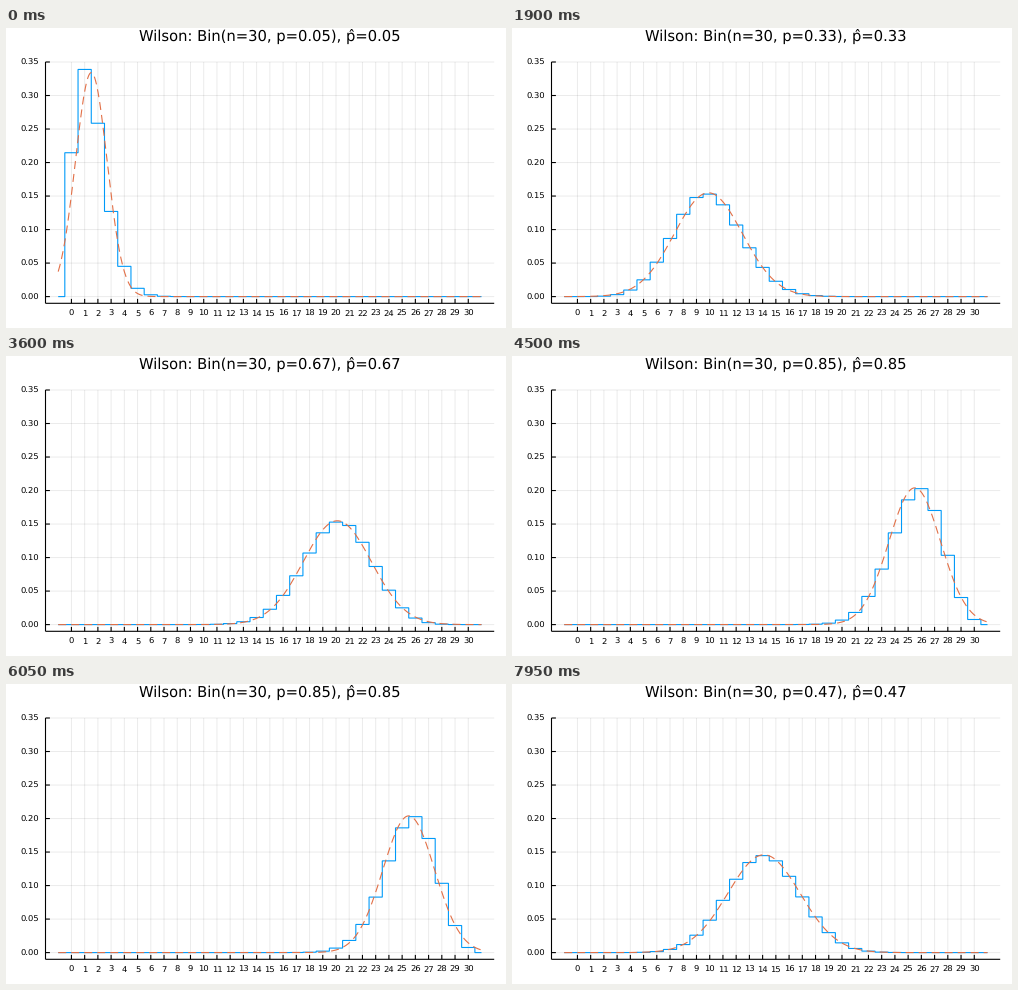
Animation, 500 px wide and 300 px high, one loop 8000 ms. Source, as a matplotlib script:

```python
import math

import matplotlib.pyplot as plt
import numpy as np
from matplotlib.animation import FuncAnimation

W, H, DPI = 500, 300, 100
PX = 72 / DPI                      # points per pixel
STEP_MS, FRAMES = 50, 160
N = 30
LEFT, RIGHT, TOP, BOTTOM = 39.5, 488.2, 34.0, 275.3
X_MIN, X_MAX = -1.96, 31.96
Y_MIN, Y_MAX = -0.01, 0.35
BLUE, ORANGE = "#009AF9", "#E26F46"

plt.rcParams["font.family"] = "DejaVu Sans"
plt.rcParams["text.hinting"] = "none"


def to_x(v):
    return LEFT + (np.asarray(v) - X_MIN) / (X_MAX - X_MIN) * (RIGHT - LEFT)


def to_y(v):
    return BOTTOM - (np.asarray(v) - Y_MIN) / (Y_MAX - Y_MIN) * (BOTTOM - TOP)


fig = plt.figure(figsize=(W / DPI, H / DPI), dpi=DPI, facecolor="white")
ax = fig.add_axes([0, 0, 1, 1])
ax.set_xlim(0, W)
ax.set_ylim(H, 0)
ax.axis("off")


def line(xs, ys, color="black", width=1.1, **kw):
    kw.setdefault("solid_capstyle", "butt")
    return ax.plot(xs, ys, color=color, lw=width * PX, snap=False, **kw)[0]


def label(x, y, text, size, ha="center"):
    return ax.text(x, y, text, fontsize=size * PX, ha=ha, va="baseline")


def draw_axes():
    for k in range(N + 1):
        x = to_x(k)
        line([x, x], [TOP, BOTTOM], width=1, alpha=0.08)
        line([x, x], [BOTTOM, BOTTOM - 4.4])
        label(x, 288, str(k), 8.41)
    for k in range(8):
        v = k * 0.05
        y = to_y(v)
        line([LEFT, RIGHT], [y, y], width=1, alpha=0.08)
        line([LEFT, LEFT + 4.4], [y, y])
        label(32.8, y + 3.1, f"{v:.2f}", 8.41, ha="right")
    line([LEFT, LEFT], [TOP, BOTTOM])
    line([LEFT, RIGHT], [BOTTOM, BOTTOM])


draw_axes()

ks = np.arange(N + 1)
choose = np.array([math.comb(N, k) for k in ks], dtype=float)
edges = np.concatenate(([-1], np.arange(-0.5, N + 1), [N + 1]))
step_x = to_x(np.repeat(edges, 2)[1:-1])
grid = np.linspace(-1, N + 1, 500)

bars = line(step_x, step_x * 0, BLUE, solid_joinstyle="miter")
curve = line(to_x(grid), grid * 0, ORANGE, dashes=(8 / 1.1, 5 / 1.1),
             dash_capstyle="butt")
title = label((LEFT + RIGHT) / 2, 12.8, "", 14.72)


def percent(i):
    """Hold at 5, climb to 95, hold, then fall again."""
    if i < 100:
        return 5 + max(0, i - 10)
    return 95 - max(0, i - 111)


def draw(i):
    p = percent(i) / 100
    pmf = choose * p ** ks * (1 - p) ** (N - ks)
    heights = np.concatenate(([0], pmf, [0]))
    bars.set_ydata(to_y(np.repeat(heights, 2)))

    var = N * p * (1 - p)
    bell = np.exp(-(grid - N * p) ** 2 / (2 * var)) / math.sqrt(2 * math.pi * var)
    curve.set_ydata(to_y(bell))

    title.set_text(f"Wilson: Bin(n={N}, p={p}), p\u0302={p}")
    return bars, curve, title


anim = FuncAnimation(fig, draw, frames=FRAMES, interval=STEP_MS,
                     repeat=True, repeat_delay=0)
plt.show()
```
